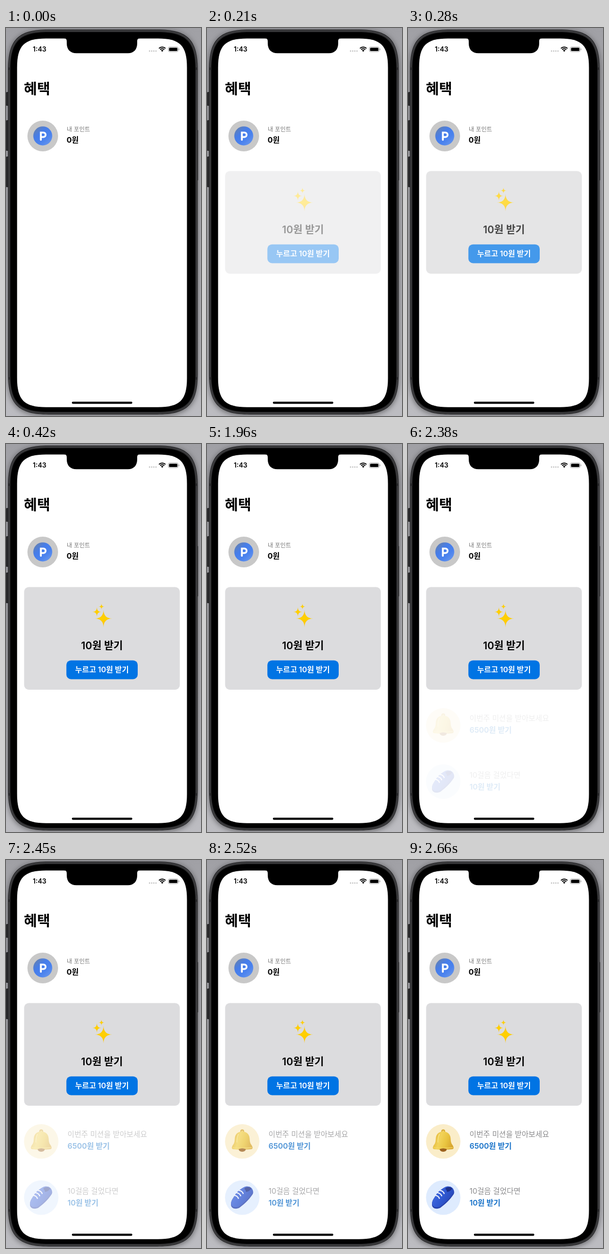
Animation, 382 px wide and 758 px high, one loop 3.22 s. Source, as an HTML page with a canvas:

```html
<!DOCTYPE html>
<html lang="ko">
<head>
<meta charset="utf-8">
<title>혜택</title>
<style>
html, body { margin: 0; width: 100%; height: 100%; overflow: hidden; background: #a5a5aa; }
canvas { display: block; width: 382px; height: 758px; }
</style>
</head>
<body>
<canvas id="stage"></canvas>
<script>
const W = 382, H = 758, LOOP = 3220, TICK = 70;
const FONT = 'Inter, "Noto Sans CJK KR", "Noto Sans CJK", sans-serif';
const canvas = document.getElementById('stage');
const ctx = canvas.getContext('2d');
const ratio = window.devicePixelRatio || 1;
canvas.width = W * ratio;
canvas.height = H * ratio;

function box(x, y, w, h, r, fill) {
  ctx.beginPath();
  ctx.roundRect(x, y, w, h, r);
  ctx.fillStyle = fill;
  ctx.fill();
}

// Rounded box whose corners ease into the straight sides.
function smoothBox(x, y, w, h, r, fill) {
  const e = r * 1.35, c = r * 0.331, x2 = x + w, y2 = y + h;
  ctx.beginPath();
  ctx.moveTo(x + e, y);
  ctx.lineTo(x2 - e, y);
  ctx.bezierCurveTo(x2 - c, y, x2, y + c, x2, y + e);
  ctx.lineTo(x2, y2 - e);
  ctx.bezierCurveTo(x2, y2 - c, x2 - c, y2, x2 - e, y2);
  ctx.lineTo(x + e, y2);
  ctx.bezierCurveTo(x + c, y2, x, y2 - c, x, y2 - e);
  ctx.lineTo(x, y + e);
  ctx.bezierCurveTo(x, y + c, x + c, y, x + e, y);
  ctx.fillStyle = fill;
  ctx.fill();
}

function disc(x, y, r, fill) {
  ctx.beginPath();
  ctx.arc(x, y, r, 0, Math.PI * 2);
  ctx.fillStyle = fill;
  ctx.fill();
}

function shape(d, fill) {
  ctx.fillStyle = fill;
  ctx.fill(new Path2D(d));
}

function line(d, width, color) {
  ctx.lineWidth = width;
  ctx.strokeStyle = color;
  ctx.lineCap = 'round';
  ctx.stroke(new Path2D(d));
}

function text(s, x, y, size, weight, color, align = 'left') {
  ctx.font = `${weight} ${size}px ${FONT}`;
  ctx.textAlign = align;
  ctx.fillStyle = color;
  ctx.fillText(s, x, y);
}

function gradient(x0, y0, x1, y1, ...colors) {
  const g = ctx.createLinearGradient(x0, y0, x1, y1);
  colors.forEach((c, i) => g.addColorStop(i / (colors.length - 1), c));
  return g;
}

// Cubic ease-in-out with control points (.42, 0) and (.58, 1).
function easeInOut(p) {
  if (p <= 0) return 0;
  if (p >= 1) return 1;
  let lo = 0, hi = 1;
  for (let i = 0; i < 24; i++) {
    const u = (lo + hi) / 2, v = 1 - u;
    const x = 1.26 * v * v * u + 1.74 * v * u * u + u * u * u;
    if (x < p) lo = u; else hi = u;
  }
  return lo * lo * (3 - 2 * lo);
}

function phone() {
  ctx.fillStyle = gradient(0, 0, 0, H, '#a0a0a5', '#b0b0b5', '#b4b4b9', '#bcbcc1');
  ctx.fillRect(0, 0, W, H);
  ctx.save();
  ctx.shadowColor = 'rgba(0, 0, 0, 0.5)';
  ctx.shadowBlur = 12 * ratio;
  ctx.shadowOffsetY = 2 * ratio;
  smoothBox(4, 3, 371.5, 752, 59, '#1e1e20');
  ctx.restore();
  for (const [y, h] of [[125, 27], [180, 60], [251, 60]]) box(0, y, 5, h, 1.5, '#29292b');
  box(372, 199, 4.3, 99, 1.5, '#29292b');
  smoothBox(5.2, 4.2, 369.1, 749.6, 58, '#4a4a4c');
  smoothBox(6.4, 5.4, 366.7, 747.2, 57, '#313133');
  smoothBox(8.5, 8, 362.5, 742, 55, '#000');
  ctx.fillStyle = '#29292b';
  for (const y of [77, 682]) {
    ctx.fillRect(5, y, 3.5, 5);
    ctx.fillRect(371, y, 3.5, 5);
  }
  smoothBox(21.7, 20.5, 332.8, 720.3, 42, '#fff');
  shape('M113 20 C118 20.5 119 22 119 27 V30 C119 42 126 49.3 138 49.3 H239 ' +
    'C250 49.3 257 42 257 30 V27 C257 22 258 20.5 263 20 Z', '#000');
  box(129, 730, 118.5, 4.2, 2.1, '#000');
}

function statusBar() {
  text('1:43', 52.5, 46.3, 13, 600, '#000');
  for (let i = 0; i < 4; i++) disc(281.2 + i * 4.2, 45, 1.35, '#bebebe');
  ctx.lineCap = 'butt';
  ctx.strokeStyle = '#000';
  ctx.lineWidth = 2;
  for (const r of [9.1, 5.8]) {
    ctx.beginPath();
    ctx.arc(306, 46.3, r, -Math.PI * 0.75, -Math.PI * 0.25);
    ctx.stroke();
  }
  shape('M306 46.6 L303.6 43.7 Q306 41.8 308.4 43.7 Z', '#000');
  ctx.beginPath();
  ctx.roundRect(317.9, 36.9, 19.4, 9.6, 2.8);
  ctx.lineWidth = 0.9;
  ctx.strokeStyle = '#9d9d9d';
  ctx.stroke();
  box(319.4, 38.4, 16.4, 6.6, 1.5, '#000');
  box(338.2, 40, 1.2, 3.4, 0.8, '#9d9d9d');
}

function header() {
  text('혜택', 35, 128.5, 28, 700, '#000');
  disc(72, 211, 30, '#c8c8c8');
  disc(72, 210.8, 18.6, gradient(58, 196, 85, 227, '#6280b4', '#467dea', '#4a82ee', '#6594ec'));
  line('M68.3 218.4 V204.2 H73.2 A4.4 4.4 0 0 1 73.2 213 H68.8', 3.6, '#fff');
  text('내 포인트', 119, 202, 11.6, 500, '#787878');
  text('0원', 118.7, 224, 14.8, 700, '#000');
}

function sparkle(x, y, r) {
  const a = r * 0.02;
  shape(`M${x} ${y - r} Q${x + a} ${y - a} ${x + r} ${y} Q${x + a} ${y + a} ${x} ${y + r} ` +
    `Q${x - a} ${y + a} ${x - r} ${y} Q${x - a} ${y - a} ${x} ${y - r} Z`,
    gradient(x, y - r, x, y + r, '#f9c414', '#ffd000', '#fcc208'));
}

function card() {
  box(35.5, 279.5, 305, 200.5, 9, '#dcdcde');
  sparkle(191, 341, 17);
  sparkle(178, 328, 8.8);
  sparkle(187, 317.6, 5.6);
  text('10원 받기', 188, 401, 20, 600, '#000', 'center');
  box(118.3, 422.7, 139.7, 36.8, 9, '#0074e4');
  text('누르고 10원 받기', 188, 446.3, 14.8, 600, '#fff', 'center');
}

function bell() {
  disc(69, 549.8, 33.7, '#faedc9');
  disc(69, 530, 3.8, '#d8a933');
  disc(69, 530.2, 1.7, '#f3d36a');
  shape('M69 530.5 C78 530.5 83 536 83.5 544 C84 552 85 554 88 558 Q91 564 87 565 ' +
    'Q69 567 51 565 Q47 564 50 558 C53 554 54 552 54.5 544 C55 536 60 530.5 69 530.5 Z',
    gradient(50, 540, 88, 552, '#e0b137', '#f2d359', '#e9c440', '#d8a62f'));
  line('M50.5 561.8 Q69 564 87.5 561.8', 1.3, '#f5d964');
  shape('M62 564.8 Q69 561.8 76 564.8 Q75.5 569.8 69 569.9 Q62.5 569.8 62 564.8 Z', '#9c611d');
  line('M61.5 536 Q58.6 542 58.6 551', 2, '#f7e07c');
}

function shoe() {
  disc(69, 659.5, 33.7, '#deebfe');
  shape('M47 672 C47 665 51 661 54 656 C57 650 65 643 72 639.5 C77 636.5 85 637.5 88 642 ' +
    'C91 647 91.5 651 88 655 C82 664 72 673 64 679 C58 683 46 682 47 672 Z', '#2843ae');
  shape('M47.3 670 C48 665 51 661 54 656 C57 650 65 643 72 639.5 C77 636.5 85 637.5 88 642 ' +
    'C90 646 90.5 649 87.5 653 C80 662 72 670 64 676 C58 680 47 679 47.3 670 Z',
    gradient(52, 648, 84, 666, '#3f68de', '#3059d2', '#2848b9'));
  shape('M73 642 C76 638.3 84 638 86.5 642 C85 645.5 80 648 76.5 648.5 Q76 644.5 73 642 Z', '#1d318a');
  for (const [x, y] of [[53.5, 655], [58, 650], [62.8, 645.5]]) {
    line(`M${x} ${y} Q${x + 6} ${y + 1} ${x + 8} ${y + 6}`, 2.2, '#f4f6fb');
  }
}

function missions() {
  const gray = '#8b8b8d', blue = '#1470c8';
  bell();
  text('이번주 미션을 받아보세요', 120.5, 540.5, 14.6, 400, gray);
  text('6500원 받기', 120.5, 564, 14.8, 600, blue);
  shoe();
  text('10걸음 걸었다면', 120.5, 651.5, 14.6, 400, gray);
  text('10원 받기', 120.5, 675, 14.8, 600, blue);
}

// Composites a whole group at one opacity.
const layer = document.createElement('canvas').getContext('2d');
function fade(draw, alpha) {
  if (alpha <= 0) return;
  if (alpha >= 1) return draw();
  layer.canvas.width = canvas.width;
  layer.canvas.height = canvas.height;
  layer.drawImage(canvas, 0, 0);
  draw();
  ctx.save();
  ctx.setTransform(1, 0, 0, 1, 0, 0);
  ctx.globalAlpha = 1 - alpha;
  ctx.drawImage(layer.canvas, 0, 0);
  ctx.restore();
}

function render(ms) {
  const t = Math.floor((ms % LOOP) / TICK) * TICK;
  ctx.setTransform(ratio, 0, 0, ratio, 0, 0);
  phone();
  statusBar();
  header();
  fade(card, t < 210 ? 0 : easeInOut((t - 55) / 350));
  fade(missions, easeInOut((t - 2290) / 350));
}

const start = performance.now();
function loop() {
  render(performance.now() - start);
  requestAnimationFrame(loop);
}
loop();
</script>
</body>
</html>
```
